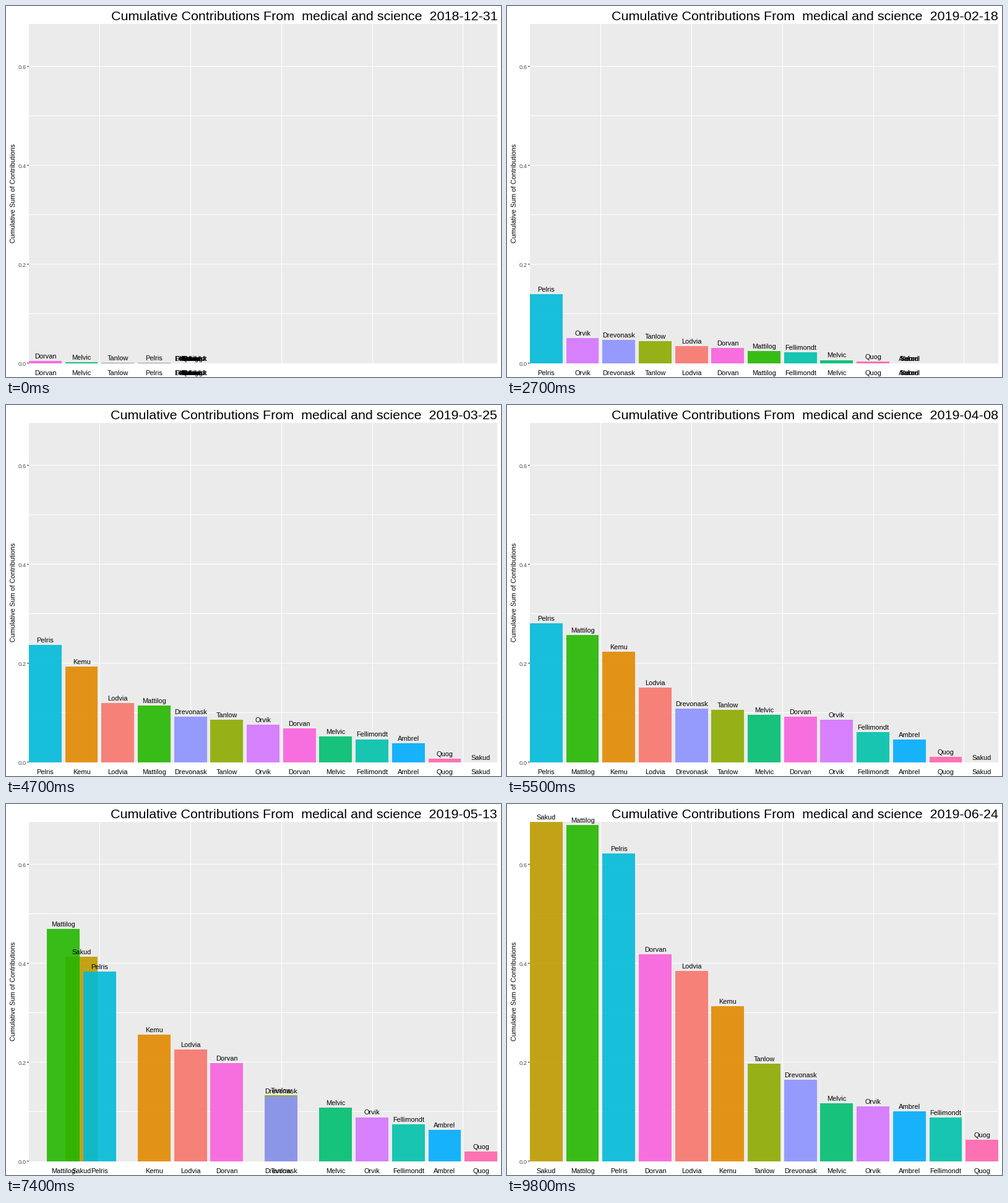
A matplotlib script that plays this animation: 800x600 px, repeating every 10000 ms.

```python
import numpy as np
import matplotlib.pyplot as plt
from matplotlib.animation import FuncAnimation
from matplotlib.patches import Rectangle

plt.rcParams["font.family"] = "Liberation Sans"

W, H, DPI = 800, 600, 100
LEFT, RIGHT, TOP, BASE = 37, 794, 29, 578
SLOT = (RIGHT - LEFT) / 12.9
BAR_W = 0.9 * SLOT
FRAMES, INTERVAL = 100, 100
LAST_WEEK = 25
START = np.datetime64("2018-12-31")

# Bar heights in pixels (800 px per unit) at the anchor weeks
ANCHORS = [0, 4, 10, 14, 17, 21, 25]
SERIES = {
    "Lodvia": ("#F8766D", [0, 0, 71, 121, 164, 209, 308]),
    "Kemu": ("#E18A00", [0, 0, 135, 179, 195, 221, 251]),
    "Sakud": ("#BE9C00", [0, 0, 0, 0, 154, 477, 549]),
    "Tanlow": ("#8CAB00", [0.8, 19, 53, 85, 102, 116, 158]),
    "Mattilog": ("#24B700", [0, 5, 36, 206, 345, 428, 544]),
    "Melvic": ("#00BE70", [2, 3, 8, 77, 86, 88, 94]),
    "Fellimondt": ("#00C1AB", [0, 10, 26, 49, 57, 65, 71]),
    "Pelris": ("#00BBDA", [0.6, 68, 156, 225, 277, 358, 498]),
    "Ambrel": ("#00ACFC", [0, 0, 25.8, 37, 48, 57, 81]),
    "Drevonask": ("#8B93FF", [0, 0, 62, 87, 92, 113, 132]),
    "Orvik": ("#D575FE", [0, 30, 52.5, 69, 70, 74, 89]),
    "Dorvan": ("#F962DD", [4, 15, 35.8, 74, 136, 198, 335]),
    "Quog": ("#FF65AC", [0, 2, 4, 9, 13, 20, 35]),
}
# Late starts and sudden jumps between the anchors
JUMPS = {
    "Lodvia": {6: 0, 7: 28},
    "Kemu": {9: 0, 13: 165},
    "Sakud": {15: 0, 16: 96, 18: 270, 19: 392, 20: 436},
    "Tanlow": {3: 3},
    "Mattilog": {2: 0, 3: 1.5, 11: 65, 12: 92, 13: 137, 15: 252, 16: 300},
    "Fellimondt": {1: 0, 2: 3},
    "Pelris": {2: 1, 3: 40},
    "Ambrel": {7: 0, 8: 10, 23: 67.5},
    "Drevonask": {5: 12, 6: 30, 19: 110},
    "Orvik": {1: 6, 2: 14},
}


def weekly_heights(name):
    knots = {**dict(zip(ANCHORS, SERIES[name][1])), **JUMPS.get(name, {})}
    weeks = sorted(knots)
    return np.interp(np.arange(LAST_WEEK + 1), weeks, [knots[w] for w in weeks])


heights = np.array([weekly_heights(name) for name in SERIES])
# Rank 1 is the tallest bar; ties share the smallest rank
ranks = 1 + (heights[None, :, :] > heights[:, None, :]).sum(axis=1)


def arrival(week):
    return 0 if week == 0 else min(4 * week - 1, FRAMES - 2)


def state(frame):
    """Heights, ranks and week; one half-way frame precedes each arrival."""
    week = max(w for w in range(LAST_WEEK + 1) if arrival(w) <= frame)
    if week < LAST_WEEK and arrival(week + 1) - 1 == frame:
        pair = slice(week, week + 2)
        return heights[:, pair].mean(axis=1), ranks[:, pair].mean(axis=1), week + 1
    return heights[:, week], ranks[:, week], week


def slot_x(rank):
    return LEFT + BAR_W / 2 + (rank - 1) * SLOT


fig = plt.figure(figsize=(W / DPI, H / DPI), dpi=DPI, facecolor="white")
ax = fig.add_axes([0, 0, 1, 1])
ax.set_xlim(0, W)
ax.set_ylim(H, 0)
ax.axis("off")


def box(x, y, w, h, color, **kw):
    return ax.add_patch(Rectangle((x, y), w, h, facecolor=color, linewidth=0, **kw))


def label(x, y, text, px, color="black", ha="center", **kw):
    return ax.text(x, y, text, fontsize=px * 72 / DPI, color=color, ha=ha,
                   va="baseline", **kw)


# Panel, grid and vertical axis
box(LEFT, TOP, RIGHT - LEFT, BASE - TOP, "#EBEBEB", zorder=0)
for k in range(7):
    y = BASE - 1 - 80 * k
    if k:
        box(LEFT, y, RIGHT - LEFT, 1, "white", zorder=1)
    if k % 2 == 0:
        box(LEFT - 3, y, 3, 1, "#333333", zorder=1)
        label(LEFT - 4.5, y + 4.5, f"{k / 10:.1f}", 9.3, "#4D4D4D", ha="right")
for rank in np.arange(2.5, 13, 2.5):
    box(round(slot_x(rank)), TOP, 1, BASE - TOP, "white", zorder=1)
label(15.5, 303, "Cumulative Sum of Contributions", 10.85,
      rotation=90, rotation_mode="anchor")
title = label(RIGHT, 23, "", 21.5, ha="right", zorder=5)

bars = [box(0, BASE, BAR_W, 0, color, alpha=0.9, zorder=2)
        for color, _ in SERIES.values()]
tops = [label(0, 0, name, 11, zorder=4) for name in SERIES]
feet = [label(0, BASE + 19, name, 11, zorder=4) for name in SERIES]


def draw(frame):
    hs, rs, week = state(frame)
    title.set_text("Cumulative Contributions From  medical and science  "
                   f"{START + 7 * week}")
    for bar, top, foot, h, r, (color, _) in zip(bars, tops, feet, hs, rs,
                                                SERIES.values()):
        x = slot_x(r)
        size = max(h, 1) if h > 0 else 0
        bar.set_bounds(x - BAR_W / 2, BASE - size, BAR_W, size)
        bar.set_visible(size > 0)
        bar.set_facecolor(color if h > 1.2 else "#8F8F8F")
        top.set_position((x, BASE - h - 4))
        foot.set_x(x)
    return [title, *bars, *tops, *feet]


anim = FuncAnimation(fig, draw, frames=FRAMES, interval=INTERVAL,
                     repeat=True, repeat_delay=0, blit=False)
plt.show()
```
